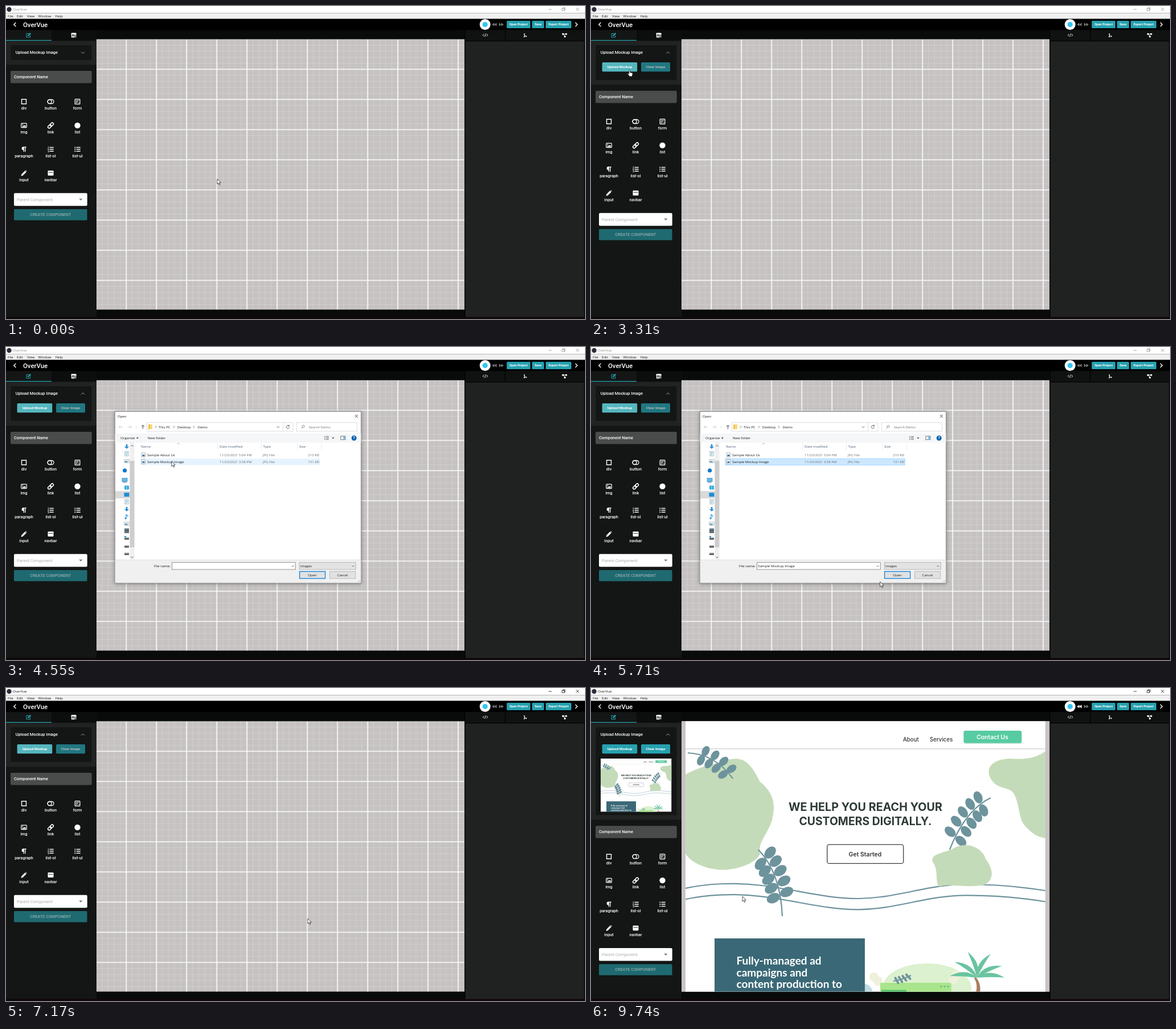
Recreate the animation shown at these times as an HTML page. Size 1017 by 550 pixels, loop 9840 ms.

```html
<!DOCTYPE html>
<html lang="en">
<head>
<meta charset="utf-8">
<title>Mockup upload</title>
<style>
html, body { margin: 0; width: 100%; height: 100%; overflow: hidden; background: #000; }
svg { display: block; width: 100vw; height: 100vh; }
text { white-space: pre; }
.ui { font-family: Roboto, sans-serif; }
.win { font-family: "Open Sans", sans-serif; }
.site { font-family: Inter, sans-serif; }
.lato { font-family: Lato, sans-serif; }
</style>
</head>
<body>
<script>
const LOOP = 9840;
const TEAL = '#26a1af', LEAF = '#6d939c', PALE = '#c4dbb9';

// ---------- markup helpers ----------
const rect = (x, y, w, h, fill, more = '') =>
  `<rect x="${x}" y="${y}" width="${w}" height="${h}" fill="${fill}" ${more}/>`;
const circle = (x, y, r, fill, more = '') =>
  `<circle cx="${x}" cy="${y}" r="${r}" fill="${fill}" ${more}/>`;
const line = (d, stroke, w = 1, more = '') =>
  `<path d="${d}" fill="none" stroke="${stroke}" stroke-width="${w}" ${more}/>`;
const shape = (d, fill, more = '') => `<path d="${d}" fill="${fill}" ${more}/>`;
const text = (cls, x, y, s, size, fill, more = '') =>
  `<text class="${cls}" x="${x}" y="${y}" font-size="${size}" fill="${fill}" ${more}>${s}</text>`;
const at = (x, y, inner) => `<g transform="translate(${x} ${y})">${inner}</g>`;
const MID = 'text-anchor="middle"', END = 'text-anchor="end"';
const W5 = 'font-weight="500"', W6 = 'font-weight="600"', W7 = 'font-weight="700"';
const win = (x, y, s, fill = '#1a1a1a', more = '') => text('win', x, y, s, 6.1, fill, more);
const chevron = (x, y, r, color, w = .8) =>
  line(`M${x - r} ${y - r / 2}l${r} ${r}l${r} ${-r}`, color, w);

function button(x, y, w, h, label, size, fill, ink = '#fff', more = '') {
  return rect(x, y, w, h, fill, `rx="1.5" ${more}`) +
    text('ui', x + w / 2, y + h / 2 + size * .35, label, size, ink, `${MID} ${W7}`);
}

// ---------- component icons ----------
const bars = [-3.4, 0, 3.4].map(y => `M-2 ${y}H5.2`).join('');
const icons = {
  div: line('M-4-4H4V4H-4Z', '#fff', 1.4),
  button: rect(-5.4, -3.5, 10.8, 7, 'none', 'rx="3.5" stroke="#fff" stroke-width="1.3"') +
    circle(-1.9, 0, 3.5, 'none', 'stroke="#fff" stroke-width="1.3"'),
  form: rect(-4.4, -4.4, 8.8, 8.8, 'none', 'rx="1" stroke="#fff" stroke-width="1.2"') +
    line('M-3-2H3M-3 0H1M-3 2H0M1.5 2H3.2', '#fff', 1.1),
  img: rect(-4.8, -3.7, 9.6, 7.4, 'none', 'rx="1" stroke="#fff" stroke-width="1.2"') +
    shape('M-3.6 2.5L-1.4-.2L0 1L1.8-1.2L3.8 2.5Z', '#fff') + circle(-2.2, -1.6, .9, '#fff'),
  link: `<g transform="rotate(-45)">` +
    rect(-6, -2.2, 6.8, 4.4, 'none', 'rx="2.2" stroke="#fff" stroke-width="1.5"') +
    rect(-.8, -2.2, 6.8, 4.4, 'none', 'rx="2.2" stroke="#fff" stroke-width="1.5"') + '</g>',
  list: circle(0, 0, 5.2, '#fff'),
  paragraph: shape('M4.3-4.5H-1A2.9 2.9 0 0 0-1 1.3V4.5H.3V-3.2H1.6V4.5H2.9V-3.2H4.3Z', '#fff'),
  'list-ol': line(bars, '#fff', 1.5) + line('M-4.2-5V-2M-5-1H-3.6L-4.9 1H-3.5M-5 2.4H-3.6V5H-5', '#fff', .8),
  'list-ul': line(bars, '#fff', 1.5) + [-3.4, 0, 3.4].map(y => circle(-4.3, y, 1, '#fff')).join(''),
  input: shape('M-5 5L-4.3 2L1.8-4.1L4.1-1.8L-2 4.3Z M2.5-4.8L3.3-5.3L5.3-3.3L4.8-2.5Z', '#fff'),
  navbar: rect(-5, -4.4, 10, 8.8, '#fff', 'rx="1"') + rect(-3.8, -1.8, 7.6, .9, '#222')
};

const iconGrid = Object.keys(icons).map((name, i) => {
  const x = 31.5 + 47 * (i % 3), y = 168 + 41.9 * Math.floor(i / 3);
  return at(x, y, icons[name]) + text('ui', x, y + 14, name, 7.2, '#fff', `${MID} ${W5}`);
}).join('');

// ---------- window chrome ----------
const chrome =
  rect(0, 0, 1017, 12.5, '#fff') + rect(0, 12.5, 1017, 10.2, '#f0f0f0') +
  circle(5.5, 6, 4.2, '#2b2e3a') +
  `<g id="title">${win(12, 8.3, 'OverVue', 'currentColor')}` +
  line('M953 6H958.5M976.7 4.3H980.7V8.3H976.7ZM978 4.3V3H982V7H980.7M1001.3 3.2L1006.5 8.4M1006.5 3.2L1001.3 8.4', 'currentColor', .8) + '</g>' +
  [['File', 3], ['Edit', 19], ['View', 37], ['Window', 56.5], ['Help', 86.5]].map(([s, x]) => win(x, 19.6, s)).join('') +
  rect(0, 22.7, 1017, 19.5, '#000') +
  line('M17.3 29L13.8 32.5L17.3 36', '#fff', 1.4) + text('ui', 30, 36.6, 'OverVue', 11.4, '#fff', W5) +
  circle(841.5, 32.5, 9.5, '#fff') + circle(841.5, 32.5, 4.6, '#36c5f0') +
  shape('M857.8 29.4V35.6L853.6 32.5ZM861.8 29.4V35.6L857.6 32.5Z', '#777', 'id="undo"') +
  shape('M866 29.4V35.6L870.2 32.5ZM870 29.4V35.6L874.2 32.5Z', '#777') +
  button(879.5, 26, 41.5, 13, 'Open Project', 5.5, TEAL) +
  button(924, 26, 21, 13, 'Save', 5.5, TEAL) +
  button(948, 26, 45, 13, 'Export Project', 5.5, TEAL) +
  line('M1000 29L1003.5 32.5L1000 36', '#fff', 1.4);

const sides =
  rect(0, 42, 159, 508, '#131615') + rect(80, 42, 79, 19, '#0c0e0d') + rect(0, 59.8, 80, 1.3, TEAL) +
  at(39.5, 51.5, line('M1-3H-3.5V3.5H3V0', TEAL, 1) + shape('M-1.6 1.6L-1.2-.3L3-4.4L4.6-2.8L.4 1.3Z', TEAL)) +
  at(119, 51.3, shape('M-4-4H4L5-1H-5Z', '#fff') + line('M-3.5-1V3.5H1V-1M3.5-1V4M-3.5 1.5H1', '#fff', 1.2)) +
  rect(159, 42, 647, 17, '#090b0a') + rect(159, 533, 647, 14, '#090b0a') +
  rect(807, 42, 210, 508, '#202221') + rect(807, 42, 210, 20, '#101211') +
  rect(805.5, 42, 1.5, 508, '#030303') + rect(876.3, 42, 1.2, 20, '#000') +
  rect(807, 61, 210, 1.2, '#000') + rect(1015, 42, 2, 508, '#0d0f0e') +
  line('M839.6 49L837.6 51.2L839.6 53.4M844 49L846 51.2L844 53.4M842.6 48.4L841 54', '#fff', .9) +
  at(912, 51.5, line('M-1.5-2V2M-1.5 0L1.5 1.6', '#fff', .9) + circle(-1.5, -2.2, 1.1, '#fff') + circle(-1.5, 2.4, 1.1, '#fff') + circle(1.8, 1.8, 1.1, '#fff')) +
  at(981, 51.3, line('M-3-2H3M-2-2L.5 2', '#fff', .9) + rect(-4.2, -3.4, 3, 2.8, '#fff') + rect(1.4, -3.4, 3, 2.8, '#fff') + rect(-.8, 1, 3, 2.8, '#fff')) +
  rect(0, 546.4, 1017, 3.6, '#10070b');

const panel =
  rect(0, 61.2, 159, 42, '#212322', 'id="block"') + rect(8.3, 69, 142, 26, '#131615', 'id="card" rx="1"') +
  rect(8.3, 69, 142, 26, '#3a3c3b', 'id="hover" rx="1"') +
  text('ui', 16.7, 84.4, 'Upload Mockup Image', 7.4, '#fff', W5) +
  `<g id="chev">${chevron(0, 0, 3, 'currentColor', .9)}</g>` +
  `<g id="sub" clip-path="url(#cardClip)">` +
  button(19.6, 99, 61.6, 16.3, 'Upload Mockup', 6.2, TEAL, '#fff', 'id="up"') +
  `<g id="clear">${button(88, 99, 51, 16.3, 'Clear Image', 6.2, TEAL)}</g>` +
  `<g id="thumb" transform="translate(17 124) scale(.197) translate(-166 -58.5)"><use href="#mock"/></g></g>` +
  `<g id="low">` +
  rect(8, 114, 142.7, 21.6, '#4a4c4b', 'rx="2"') + text('ui', 14, 127.2, 'Component Name', 7.4, '#fff', W5) + iconGrid +
  rect(14, 328.8, 128.7, 22.4, '#fff', 'rx="2"') + text('ui', 19, 342.5, 'Parent Component', 7.5, '#adadad') +
  shape('M128.2 338.5H134.4L131.3 341.8Z', '#777') +
  rect(14, 357, 128.5, 19.5, '#1f6a71', 'rx="1.5"') + text('ui', 78.3, 369.1, 'CREATE COMPONENT', 7.2, '#91adb0', `${MID} ${W5}`) +
  `</g>`;

// ---------- landing page mockup ----------
function branch(x0, y0, cx, cy, x1, y1, n, from, to, off, rx, ry, lean) {
  let out = line(`M${x0} ${y0}Q${cx} ${cy} ${x1} ${y1}`, LEAF, 2.2);
  for (let i = 0; i < n; i++) {
    const u = from + (to - from) * i / (n - 1), v = 1 - u;
    const x = v * v * x0 + 2 * u * v * cx + u * u * x1, y = v * v * y0 + 2 * u * v * cy + u * u * y1;
    const a = Math.atan2(v * (cy - y0) + u * (y1 - cy), v * (cx - x0) + u * (x1 - cx));
    for (const b of [a + Math.PI / 2 + lean, a - Math.PI / 2 + lean]) {
      const deg = b * 180 / Math.PI;
      out += `<ellipse rx="${rx}" ry="${ry}" fill="${LEAF}" transform="translate(${x + off * Math.cos(b)} ${y + off * Math.sin(b)}) rotate(${deg})"/>`;
    }
  }
  return out;
}

const wave = (dy, end) =>
  line(`M166 ${352 + dy}C200 ${344 + dy} 250 ${341 + dy} 300 ${347 + dy}C360 ${354 + dy} 410 ${370 + dy} 470 ${370 + dy}C540 ${369 + dy} 590 ${345 + dy} 660 ${345 + dy}C710 ${345 + dy} 760 ${350 + dy} 798 ${end}`, LEAF, 2.2);

const fronds = [-172, -140, -105, -65, -30, -5].map(a =>
  `<path d="M0 0Q22-15 48 4Q24 0 0 0Z" fill="#69c49f" transform="rotate(${a < -90 ? a + 180 : a}) scale(${a < -90 ? -1 : 1} 1)"/>`).join('');

const mock =
  rect(166, 58, 632, 476, '#fff') + rect(166, 106, 632, 1.2, '#d4d4d4') + rect(166, 107.2, 632, 1.4, '#f0f0f0') +
  shape('M166 152C190 138 215 134 238 127C272 116 284 140 297 165C320 183 325 204 318 232C310 258 292 272 297 291C288 312 245 322 222 319C194 316 174 304 166 291Z', PALE) +
  shape('M798 111C782 123 765 126 735 124C700 126 690 145 706 165C720 180 738 172 745 190C755 215 750 230 765 245C775 256 785 262 798 264Z', PALE) +
  wave(0, 356) + wave(19.3, 375.5) +
  branch(170, 114, 218, 116, 249, 159, 4, .3, .85, 9, 9.5, 6.4, .15) +
  branch(294, 284, 333, 325, 336, 401, 5, .17, .74, 13, 12, 8.5, -.25) +
  branch(702, 193, 657, 215, 630, 284, 5, .2, .82, 12.5, 11, 7.5, .25) +
  shape('M600 305C595 290 625 290 640 280C665 268 690 285 693 300C705 315 711 337 690 346C660 352 630 343 612 349C603 342 612 322 600 305Z', PALE) +
  text('site', 548, 94, 'About', 9.7, '#333', W5) + text('site', 595, 94, 'Services', 9.7, '#333', W5) +
  rect(655, 76.3, 102, 22, '#d3e6dd', 'rx="3.5"') + rect(654.5, 75, 101.7, 21.7, '#57cba1', 'rx="3"') +
  text('site', 705, 89.7, 'Contact Us', 10.4, '#fff', `${MID} ${W6}`) +
  text('site', 482, 216.3, 'WE HELP YOU REACH YOUR', 19.8, '#2d3a36', `${MID} ${W7}`) +
  text('site', 482, 240.5, 'CUSTOMERS DIGITALLY.', 19.4, '#2d3a36', `${MID} ${W7}`) +
  rect(414.8, 275.2, 134, 33.2, '#fff', 'rx="3.5" stroke="#3b3b3b" stroke-width="1.3"') +
  text('site', 481.5, 295.5, 'Get Started', 10.5, '#333', `${MID} ${W6}`) +
  `<ellipse cx="590" cy="527" rx="78" ry="43" fill="#dcf1cf"/>` +
  circle(480, 534, 14, '#bfdbe0') + rect(217, 440, 264, 100, '#3a6876') +
  ['Fully-managed ad', 'campaigns and', 'content production to'].map((s, i) =>
    text('lato', 255.5, 486 + 20.5 * i, s, 19, '#fff', W7)).join('') +
  [[497, 508], [504, 515], [642, 504], [636, 512]].map(([x, y]) => circle(x, y, 8, '#eef0dc')).join('') +
  rect(508, 518, 125, 20, '#a9e58c', 'rx="2"') + rect(510, 530.5, 44, 4, '#54c36f') +
  [615, 621, 627].map(x => circle(x, 524.5, 1.5, '#58bd7c')).join('') +
  branch(531, 515, 546, 513, 562, 505, 4, .2, .85, 3.5, 3.6, 2, -.3) +
  shape('M676 508Q686 520 683 536H676Q680 520 673 510Z', '#a87d5d') + at(678, 509, fronds);

// ---------- file dialog ----------
const blue = '#2f8fd0';
const arrowDown = shape('M-1.4-4H1.4V0H4L0 4L-4 0H-1.4Z', blue);
const doc = rect(-3.2, -4, 6.4, 8, '#f4fafc', 'stroke="#8daab5" stroke-width=".7"') + line('M-2-2H2M-2 0H2M-2 2H1', '#68a5c4', .8);
const pic = rect(-4.2, -3, 8.4, 6, '#e8f2f7', 'stroke="#9aa" stroke-width=".6"') + rect(-3.4, 0, 5, 2, '#4a87a8');
const screen = rect(-4.5, -3.5, 9, 6.2, '#63b8ea', 'stroke="#3d82a8" stroke-width=".7"');
const disk = rect(-4, -.5, 8, 3, '#555') + rect(-4, -1.6, 8, 1.2, '#aaa');
const tree = [
  [175, arrowDown], [187.5, doc], [200.5, pic], [217, circle(-3.4, 0, 3.6, '#1576c8')],
  [234, at(-3.5, 0, screen) + line('M-6.5 4H-.5', '#678', 1)], [247, shape('M-4-3L0-4L4-3V3L0 4L-4 3Z', '#35a9d6') + line('M0-4V4', '#dff', .8)],
  [259.5, rect(-4.5, -3.5, 9, 7, '#1c8fd8')], [272, doc], [285, arrowDown],
  [298, line('M-1 3V-3.5Q2.5-2 2 .5', '#1c8fd8', 1.2) + circle(-2, 3, 1.6, '#1c8fd8')], [310.5, pic],
  [323, rect(-4, -4, 8, 8, '#43535d') + line('M-4-2H4M-4 2H4', '#b9d0da', .8)],
  [336, disk + rect(-4, -4, 3, 2.6, '#2aa0dc')], [350, disk], [363, disk]
].map(([y, s]) => at(212, y, s)).join('');

const scroll = rect(217.5, 168, 8, 206, '#f0f0f0') + rect(217.5, 200, 8, 152, '#cdcdcd') +
  line('M219.3 174.6L221.5 172.4L223.7 174.6M219.3 368.4L221.5 370.6L223.7 368.4', '#444', .9);

const fileRow = (y, name, date, size) =>
  rect(238.5, y - 4, 6, 7.6, '#fff', 'stroke="#8a949b" stroke-width=".7"') + rect(239.6, y - .8, 3.8, 2.8, '#2b6fa8') +
  win(248, y + 2.2, name) + win(375, y + 2.2, date, '#6d6d6d') + win(451, y + 2.2, 'JPG File', '#6d6d6d') +
  win(550, y + 2.2, size, '#6d6d6d', END);

const content =
  line('M205 140.5H198.5M201 138L198.5 140.5L201 143M213.5 140.5H220M217.5 138L220 140.5L217.5 143', '#c4c4c4', .8) +
  chevron(229, 140.5, 1.5, '#bbb', .7) + line('M240.5 144V137.5M237.8 140L240.5 137.3L243.2 140', '#444', .9) +
  rect(247.5, 132.8, 256.5, 15.2, '#fff', 'stroke="#d4d4d4" stroke-width=".8"') + rect(486, 133, .8, 15, '#d9d9d9') +
  rect(250, 136, 7, 8.4, '#f9d774') + rect(250, 136, 2.5, 8.4, '#edc04d') +
  line('M262 138.5L264 140.5L262 142.5M294 138.5L296 140.5L294 142.5M329 138.5L331 140.5L329 142.5', '#444', .7) +
  win(268, 142.6, 'This PC') + win(301, 142.6, 'Desktop') + win(336.7, 142.6, 'Demo') +
  chevron(478, 140.6, 2.2, '#444') + line('M497 138.6A2.7 2.7 0 1 0 497.8 141M497.4 136.7V139H495', '#444', .8) +
  rect(510.3, 132.8, 106.5, 15.2, '#fff', 'stroke="#d4d4d4" stroke-width=".8"') +
  circle(522.3, 139.5, 2, 'none', 'stroke="#666" stroke-width=".7"') + line('M520.8 141L518.7 143.2', '#666', .8) +
  win(532, 142.6, 'Search Demo', '#6d6d6d') +
  rect(191.5, 152, 432, 16, '#f5f6f7') + win(201, 162.2, 'Organize') + shape('M228.8 159H232.8L230.8 161.2Z', '#333') +
  win(249, 162.2, 'New folder') + line('M559 157.3H561M559 159.8H561M559 162.3H561M562 157.3H567M562 159.8H567M562 162.3H567', '#666', 1) +
  shape('M572.5 159H576.5L574.5 161.2Z', '#333') +
  rect(588, 156.8, 8, 6, '#fff', 'stroke="#555" stroke-width=".8"') + rect(592.5, 157, 3.3, 5.6, '#76b8e0') +
  circle(611.3, 160, 4.5, '#0c62ad') + text('win', 611.3, 162.4, '?', 6.8, '#fff', `${MID} ${W7}`) +
  rect(192, 253.2, 25.5, 12.8, '#d9d9d9') + tree +
  [371, 448, 511.7, 553.7].map(x => rect(x, 168, .7, 13.5, '#e3e3e3')).join('') + line('M301 170.5L303 168.9L305 170.5', '#888', .7) +
  [['Name', 237], ['Date modified', 375], ['Type', 451.5], ['Size', 515]].map(([s, x]) => win(x, 177.2, s, '#4c607a')).join('') +
  rect(235.5, 184.6, 316, 11.4, '#e5f3ff', 'id="row1"') +
  rect(235.8, 196.2, 315.6, 11.3, '#cce8ff', 'id="row2" stroke-width=".7"') +
  fileRow(190, 'Sample About Us', '11/23/2021 5:04 PM', '210 KB') +
  fileRow(201.7, 'Sample Mockup Image', '11/23/2021 3:58 PM', '131 KB') +
  win(260, 387.2, 'File name:') + rect(291.5, 378.7, 216.8, 12.2, '#fff', 'stroke="#7a7a7a" stroke-width=".8"') +
  rect(293, 380.7, 66, 8.4, '#0078d7', 'id="mark"') + win(293.3, 387.2, 'Sample Mockup Image', '#1a1a1a', 'id="fname"') +
  chevron(503.7, 385, 2, '#444') +
  rect(515.3, 378.5, 99, 12.4, '#e3e3e3', 'stroke="#adadad" stroke-width=".8"') + win(517, 387, 'images') + chevron(609.5, 385, 2, '#444') +
  rect(515.7, 394.5, 45, 12.2, '#e1e1e1', 'id="open" stroke="#0078d7" stroke-width="1.2"') + win(538, 402.8, 'Open', '#1a1a1a', MID) +
  rect(568.5, 394.3, 45.3, 12.6, '#e1e1e1', 'stroke="#adadad" stroke-width=".8"') + win(591, 402.8, 'Cancel', '#1a1a1a', MID) +
  line('M618.5 413L622 409.5M620.5 413L622 411.5', '#aaa', .8);

const blank = [[260, 379, 29, 9], [291.5, 377, 217, 13], [515, 377, 100, 13], [515, 394, 47, 13], [568, 394, 47, 13]]
  .map(r => rect(...r, '#fff', 'opacity=".75"')).join('');

const dialog = `<g id="dialog">` +
  rect(191.2, 113.2, 432.6, 301.6, '#fff', 'stroke="#6f6f6f" stroke-width=".8" style="filter:drop-shadow(0 1.5px 3px rgba(0,0,0,.4))"') +
  win(195.8, 123.8, 'Open') + line('M612.9 118.9L618.1 124.1M618.1 118.9L612.9 124.1', '#222', .8) +
  rect(191.7, 374, 431.6, 40.4, '#f0f0f0') + rect(191.7, 373.6, 431.6, .8, '#dfdfdf') +
  `<g id="blank">${blank}</g><g id="content">${content}</g>${scroll}</g>`;

const cursors =
  shape('M0 0V9L2.1 7.1L3.6 10.4L5 9.8L3.6 6.5H6.3Z', '#fff', 'id="arrow" stroke="#111" stroke-width=".7"') +
  shape('M-.9 .6Q0-.6 .9 .6V4.4L4.6 5.2Q5.8 5.6 5.5 7.2L4.8 9.6V11.6H-.6V10.4L-3.3 6.9Q-3.2 5.5-1.9 6.2L-.9 7.2Z', '#fff', 'id="hand" stroke="#111" stroke-width=".7"');

const minor = [1, 2, 3, 4].map(i => 5 + 10.6 * i).map(p => `M${p} 0V53M0 ${p}H53`).join('');
document.body.innerHTML = `<svg viewBox="0 0 1017 550" preserveAspectRatio="none">
<defs>
<pattern id="grid" x="153.3" y="53.2" width="53" height="53" patternUnits="userSpaceOnUse">
${rect(0, 0, 53, 53, '#c6c2c2')}${line(minor, '#fff', .6, 'opacity=".32"')}${line('M5 0V53M0 5H53', '#fff', 1.6)}
</pattern>
<clipPath id="page"><rect x="166" y="58.5" width="632" height="475"/></clipPath>
<clipPath id="cardClip"><rect id="clipBox" x="8" y="69" width="143" height="26"/></clipPath>
<g id="mock" clip-path="url(#page)">${mock}</g>
</defs>
${rect(0, 0, 1017, 550, '#000')}${sides}${chrome}
${rect(159, 58.5, 646.3, 475, 'url(#grid)')}
<g id="view">${rect(159, 58.5, 646.3, 475, '#c9c4c4')}<use href="#mock"/></g>
${panel}${dialog}${cursors}</svg>`;

// ---------- timeline ----------
// Bursts of picture changes: start, end, number of steps.
const bursts = [[1000, 1970, 11], [2060, 2150, 2], [2730], [3020], [3310, 4160, 10], [4460, 4650, 3],
  [5140, 5240, 2], [5420, 6200, 9], [6590], [6890, 7550, 8], [9640, 9740, 2]];
const path = [[940, 371, 304], [1540, 106, 89.5], [1970, 106, 89.5], [2150, 55, 108], [3220, 55, 108],
  [3870, 297, 189.5], [4400, 297, 189.5], [4650, 288, 206], [5330, 288, 206], [5700, 507.7, 412.5],
  [6200, 530, 405], [9550, 530, 405], [9735, 266, 366]];
const fade = [[3700, 0], [3876, .76], [3970, 1], [6860, 1], [6890, .64], [6984, .22], [7060, 0]];

const clamp = v => Math.max(0, Math.min(1, v));
const ease = u => u * u * (3 - 2 * u);

function held(t) {
  let q = 0;
  for (const [a, b = a, n = 1] of bursts) {
    if (t < a) break;
    const d = (b - a) / (n - 1) || 1;
    q = a + d * Math.min(n - 1, Math.floor((t - a + 12) / d));
  }
  return q;
}

function along(keys, t, f = u => u) {
  let i = 0;
  while (i < keys.length - 2 && t >= keys[i + 1][0]) i++;
  const [a, b] = [keys[i], keys[i + 1]], u = f(clamp((t - a[0]) / (b[0] - a[0])));
  return a.slice(1).map((v, k) => v + (b[k + 1] - v) * u);
}

const $ = id => document.getElementById(id);
const set = (id, attrs) => { for (const k in attrs) $(id).setAttribute(k, attrs[k]); };
const show = (id, on) => set(id, { visibility: on ? 'inherit' : 'hidden' });

function render(t) {
  const q = held(t), within = (a, b) => q >= a && q < b;
  const loaded = q >= 7260;
  const opened = 1 - (1 - clamp((q - 1615) / 300)) ** 3;
  const shift = loaded ? 128.2 : 35 * opened;

  set('title', { color: within(1670, 3020) || q >= 6890 ? '#111' : '#8c8c8c' });
  set('undo', { fill: loaded ? '#fff' : '#777' });
  set('block', { height: 42 + shift });
  set('card', { height: 26 + shift });
  set('clipBox', { height: 26 + shift });
  set('low', { transform: `translate(0 ${shift})` });
  show('hover', within(1480, 2060));
  show('sub', shift > 0);
  set('chev', { transform: `translate(135 82) rotate(${-180 * opened})`, color: within(1480, 2060) ? '#8a8a8a' : '#b5b5b5' });
  set('up', { fill: within(2730, 7260) ? '#55b6be' : TEAL });
  set('clear', { opacity: loaded ? 1 : .7 });
  show('thumb', loaded);
  show('view', loaded);

  const [alpha] = along(fade, q);
  const s = alpha > .6 ? 1 - .014 * clamp((1 - alpha) * 4) : .986 - .06 * (.6 - alpha);
  show('dialog', alpha > 0);
  set('dialog', { opacity: alpha, transform: `translate(407.5 264) scale(${s}) translate(-407.5 -264)` });
  show('blank', q < 3960);
  show('content', q >= 3960);
  show('row1', q < 4460);
  show('row2', q >= 4550);
  set('row2', q >= 6590 ? { fill: '#d9d9d9', stroke: 'none' } :
    q >= 5140 ? { fill: '#cce8ff', stroke: '#8ecbfa' } : { fill: '#e5f3ff', stroke: 'none' });
  show('fname', q >= 5140);
  show('mark', q >= 6590);
  set('fname', { fill: q >= 6590 ? '#fff' : '#1a1a1a' });

  const [x, y] = along(path, q, ease);
  set('open', { fill: q >= 6590 ? '#cce4f7' : q > 5750 && y < 407 ? '#e5f1fb' : '#e1e1e1' });
  const hand = within(1480, 3400) || within(6890, 7070);
  show('hand', hand);
  show('arrow', !hand);
  set(hand ? 'hand' : 'arrow', { transform: `translate(${x} ${y})` });
}

function tick() {
  render(performance.now() % LOOP);
  requestAnimationFrame(tick);
}
tick();
</script>
</body>
</html>
```
